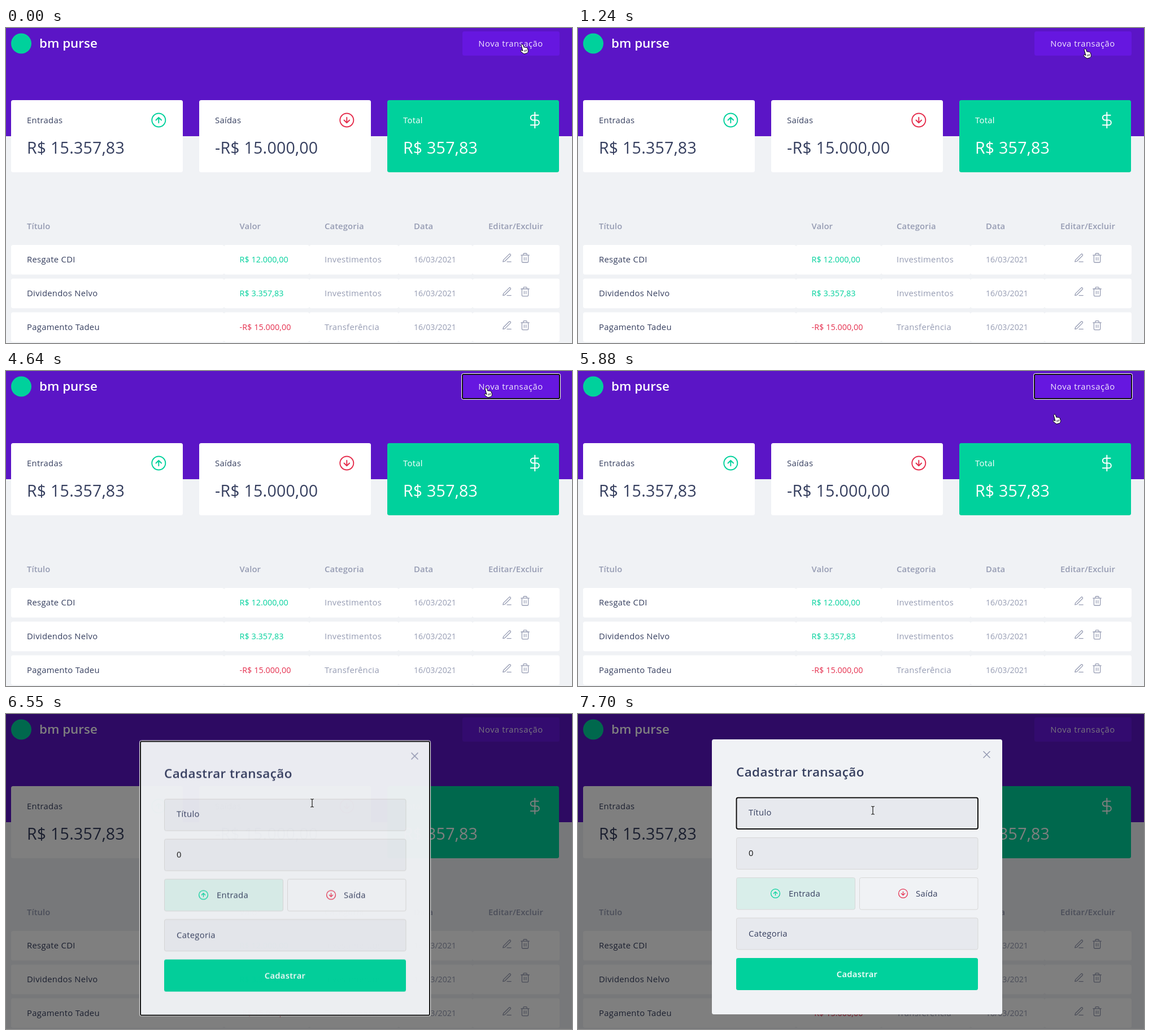
Animation of 1002x559 px, one loop 8000 ms. Source, as an HTML page:

```html
<!DOCTYPE html>
<html lang="pt-BR">
<head>
<meta charset="utf-8">
<title>Transações</title>
<style>
  :root {
    --green: #00d19c;
    --red: #e52e4d;
    --ink: #363f5f;
    --muted: #969cb3;
    --page: #f0f2f5;
  }
  html, body { margin: 0; width: 100%; height: 100%; overflow: hidden; background: var(--page); }
  svg { display: block; width: 100%; height: 100%; }

  text { font: 400 14.8px "Open Sans", sans-serif; letter-spacing: .3px; fill: var(--ink); }
  .mid { text-anchor: middle; }
  .head { font-weight: 600; letter-spacing: .1px; fill: var(--muted); }
  .muted { fill: var(--muted); }
  .date { font-size: 14.1px; letter-spacing: 0; fill: var(--muted); }
  .cash { font-size: 14.3px; letter-spacing: .08px; fill: var(--green); }
  .cash.out { fill: var(--red); }
  .total { font-weight: 500; font-size: 28.5px; letter-spacing: .25px; }
  .brand { font-weight: 600; font-size: 22.4px; letter-spacing: 0; fill: #fff; }
  .title { font-weight: 600; font-size: 22.4px; letter-spacing: .45px; }
  .new { letter-spacing: .52px; fill: #f1e8fd; }
  .white { fill: #fff; }
  .bold { font-weight: 600; }

  .icon { fill: none; stroke: currentColor; stroke-width: 1.6; stroke-linecap: round; stroke-linejoin: round; }
  .field { fill: #e7e9ee; stroke: #d7d7d7; }
  .ring { fill: none; stroke: #101010; stroke-width: 2; }
  .halo { fill: none; stroke: #fff; }

  .anim { animation: 8s step-end infinite; }
  #btnRing { animation-name: btnRing; }
  #dim { animation-name: dim; }
  #modal { animation-name: modal; }
  #modalRing { animation-name: modalRing; }
  #focus { animation-name: focus; }
  #caret { animation-name: caret; }
  #cursor { animation-name: move; }
  #hand { animation-name: hand; }
  #arrow { animation-name: arrow; }
  #beam { animation-name: beam; }

  @keyframes btnRing { 0%, 78.5%, 100% { opacity: 0 } 54.375% { opacity: 1 } }
  @keyframes dim { 0% { opacity: 0 } 78.5%, 100% { opacity: .5 } }
  @keyframes modal {
    0% { opacity: 0; transform: translateY(100px) }
    78.5% { opacity: .3; transform: translateY(100px) }
    81.875% { opacity: .975; transform: translateY(2.6px) }
    85.125%, 100% { opacity: 1; transform: none }
  }
  @keyframes modalRing { 0% { opacity: 1 } 89.875%, 100% { opacity: 0 } }
  @keyframes focus { 0% { opacity: 0 } 89.875%, 100% { opacity: 1 } }
  @keyframes caret { 0%, 96.25%, 100% { opacity: 0 } 89.875% { opacity: 1 } }
  @keyframes move {
    0% { transform: translate(910px, 28px) }
    6.25% { transform: translate(910px, 28px); animation-timing-function: steps(5, jump-start) }
    10.875% { transform: translate(902px, 53px); animation-timing-function: steps(5, jump-both) }
    15.5% { transform: translate(894px, 36px) }
    54.375% { transform: translate(845px, 29px) }
    55.75% { transform: translate(843px, 32px) }
    58% { transform: translate(846px, 29px) }
    73.5% { transform: translate(840px, 76px) }
    78.5% { transform: translate(844px, 76px) }
    81.875% { transform: translate(542px, 158px) }
    85.125% { transform: translate(537px, 163px) }
    87.375%, 100% { transform: translate(522px, 171px) }
  }
  @keyframes hand { 0% { opacity: 1 } 78.5%, 100% { opacity: 0 } }
  @keyframes arrow { 0%, 81.875%, 100% { opacity: 0 } 78.5% { opacity: 1 } }
  @keyframes beam { 0% { opacity: 0 } 81.875%, 100% { opacity: 1 } }
</style>
</head>
<body>
<svg viewBox="0 0 1002 559">
  <defs>
    <g id="up" class="icon"><circle r="10"/><path d="M4 0 0-4-4 0M0 4v-8"/></g>
    <g id="down" class="icon"><circle r="10"/><path d="M-4 0 0 4 4 0M0-4v8"/></g>
    <path id="dollar" class="icon" d="M0-11v22M5-7h-7.5a3.5 3.5 0 0 0 0 7h5a3.5 3.5 0 0 1 0 7H-6"/>
    <path id="pen" class="icon" d="M12 20h9M16.5 3.5a2.1 2.1 0 0 1 3 3L7 19l-4 1 1-4z"/>
    <path id="bin" class="icon" d="M3 6h18M19 6v14a2 2 0 0 1-2 2H7a2 2 0 0 1-2-2V6m3 0V4a2 2 0 0 1 2-2h4a2 2 0 0 1 2 2v2M10 11v6M14 11v6"/>
    <path id="bar" d="M-3-7h2l1 1 1-1h2M0-6V6M-3 7h2l1-1 1 1h2"/>
  </defs>

  <rect width="1002" height="559" fill="#f0f2f5"/>
  <rect width="1002" height="192" fill="#5b15c6"/>
  <circle cx="27" cy="27.5" r="18" fill="#00d19c"/>
  <text class="brand" x="59" y="35">bm purse</text>

  <rect x="808" y="6" width="172" height="43" rx="3.5" fill="#6617e0"/>
  <text class="new mid" x="893.5" y="33">Nova transação</text>
  <g id="btnRing" class="anim">
    <rect class="ring" x="808" y="6" width="172" height="43" rx="2"/>
    <rect class="halo" x="806.5" y="4.5" width="175" height="46" rx="3"/>
  </g>

  <g id="cards"></g>

  <text class="head" x="37" y="357.3">Título</text>
  <text class="head" x="413.5" y="357.3">Valor</text>
  <text class="head" x="564" y="357.3">Categoria</text>
  <text class="head" x="722" y="357.3">Data</text>
  <text class="head" x="854" y="357.3">Editar/Excluir</text>
  <g id="rows"></g>

  <rect id="dim" class="anim" width="1002" height="559"/>

  <g id="modal" class="anim">
    <rect x="237" y="45" width="514" height="488" rx="3.5" fill="#f0f2f5"/>
    <g id="modalRing" class="anim">
      <rect class="ring" x="238" y="46" width="512" height="486" rx="2"/>
      <rect class="halo" x="236.5" y="44.5" width="515" height="489" rx="3"/>
    </g>
    <path class="icon" d="M718 66.5l11 11m0-11-11 11" color="#969cb3"/>
    <text class="title" x="280" y="111">Cadastrar transação</text>

    <rect class="field" x="280.5" y="148.5" width="427.5" height="56" rx="3"/>
    <text x="302" y="180.3">Título</text>
    <g id="focus" class="anim">
      <rect class="halo" x="278.5" y="146.5" width="431.5" height="60" rx="4"/>
      <rect class="ring" x="280.5" y="148.5" width="427.5" height="55.5" rx="3"/>
    </g>
    <rect id="caret" class="anim" x="302" y="165" width="1" height="21"/>

    <rect class="field" x="280.5" y="219.5" width="427.5" height="56" rx="3"/>
    <text x="302" y="252" style="fill:#111">0</text>

    <rect class="field" x="280.5" y="290.5" width="210" height="56.5" rx="3" style="fill:#d9eeea"/>
    <use href="#up" transform="translate(349.5 318.5) scale(.79)" color="#00d19c"/>
    <text x="373" y="323.7">Entrada</text>
    <rect class="field" x="498.5" y="290.5" width="209.5" height="56.5" rx="3" style="fill:#f0f2f5"/>
    <use href="#down" transform="translate(575.5 318.5) scale(.79)" color="#e52e4d"/>
    <text x="598" y="323.7">Saída</text>

    <rect class="field" x="280.5" y="362" width="427.5" height="56" rx="3"/>
    <text x="302" y="395">Categoria</text>

    <rect x="280" y="433" width="428" height="57" rx="3.5" fill="#00d19c"/>
    <text class="mid bold white" x="494" y="466.5">Cadastrar</text>
  </g>

  <g id="cursor" class="anim">
    <g id="hand" class="anim">
      <path fill="#fff" stroke="#000" stroke-linejoin="round" d="M3.2 1.2c1-.6 1.9 0 2.2.9l1.5 4.2c.6-.5 1.6-.4 2 .3.7-.5 1.6-.3 2 .4.8-.5 1.8-.1 2.1.7l1.2 3.5c.6 2-.1 4-1.6 5.3l-5.5 1.6c-1.2-1-3.4-2.5-5.6-4.4-1.1-1-.1-2.6 1.4-2l2 .9L2.3 3.2c-.3-.8 0-1.6.9-2z"/>
      <path fill="none" stroke="#000" stroke-width=".8" d="M7.4 11.4l.9 3M9.3 10.8l.9 3M11.2 10.2l.9 3"/>
    </g>
    <path id="arrow" class="anim" stroke="#fff" d="M.5.5v13.5l3.2-3 2 4.7 2.2-.9-2-4.6h4.4z"/>
    <g id="beam" class="anim" fill="none">
      <use href="#bar" stroke="#fff" stroke-opacity=".6" stroke-width="2.6"/>
      <use href="#bar" stroke="#111" stroke-width="1.2"/>
    </g>
  </g>
</svg>

<script>
  const fill = (id, items, draw) =>
    document.getElementById(id).innerHTML = items.map(draw).join('');

  const cards = [
    ['Entradas', 'R$ 15.357,83', 'up', '#00d19c'],
    ['Saídas', '-R$ 15.000,00', 'down', '#e52e4d'],
    ['Total', 'R$ 357,83', 'dollar', '#fff'],
  ];
  fill('cards', cards, ([label, value, icon, color], i) => {
    const x = 9 + 333 * i, isTotal = icon === 'dollar', tone = isTotal ? 'white' : '';
    return `
      <rect x="${x}" y="128" width="304" height="128" rx="3.5" fill="${isTotal ? '#00d19c' : '#fff'}"/>
      <text class="${tone}" x="${x + 28}" y="169">${label}</text>
      <text class="total ${tone}" x="${x + 28}" y="223">${value}</text>
      <use href="#${icon}" color="${color}"
        transform="translate(${x + 261.3} 163.5) scale(${isTotal ? 1.25 : 1.2})"/>`;
  });

  const edges = [9, 386, 537, 695, 826, 980];
  const rows = [
    ['Resgate CDI', 'R$ 12.000,00', 'Investimentos'],
    ['Dividendos Nelvo', 'R$ 3.357,83', 'Investimentos'],
    ['Pagamento Tadeu', '-R$ 15.000,00', 'Transferência'],
  ];
  fill('rows', rows, ([name, value, kind], i) => {
    const cells = edges.slice(1).map((end, k) =>
      `<rect x="${edges[k]}" width="${end - edges[k]}" height="52.4" rx="3.5" fill="#fff"/>`).join('');
    return `<g transform="translate(0 ${385 + 59.8 * i})">${cells}
      <text x="37" y="31.3">${name}</text>
      <text class="cash ${value[0] === '-' ? 'out' : ''}" x="413.5" y="31.2">${value}</text>
      <text class="muted" x="564" y="31.3">${kind}</text>
      <text class="date" x="722" y="31.3">16/03/2021</text>
      <g color="#969cb3">
        <use href="#pen" transform="translate(877.4 13.8) scale(.8)"/>
        <use href="#bin" transform="translate(909.4 13.4) scale(.8)"/>
      </g></g>`;
  });
</script>
</body>
</html>
```
